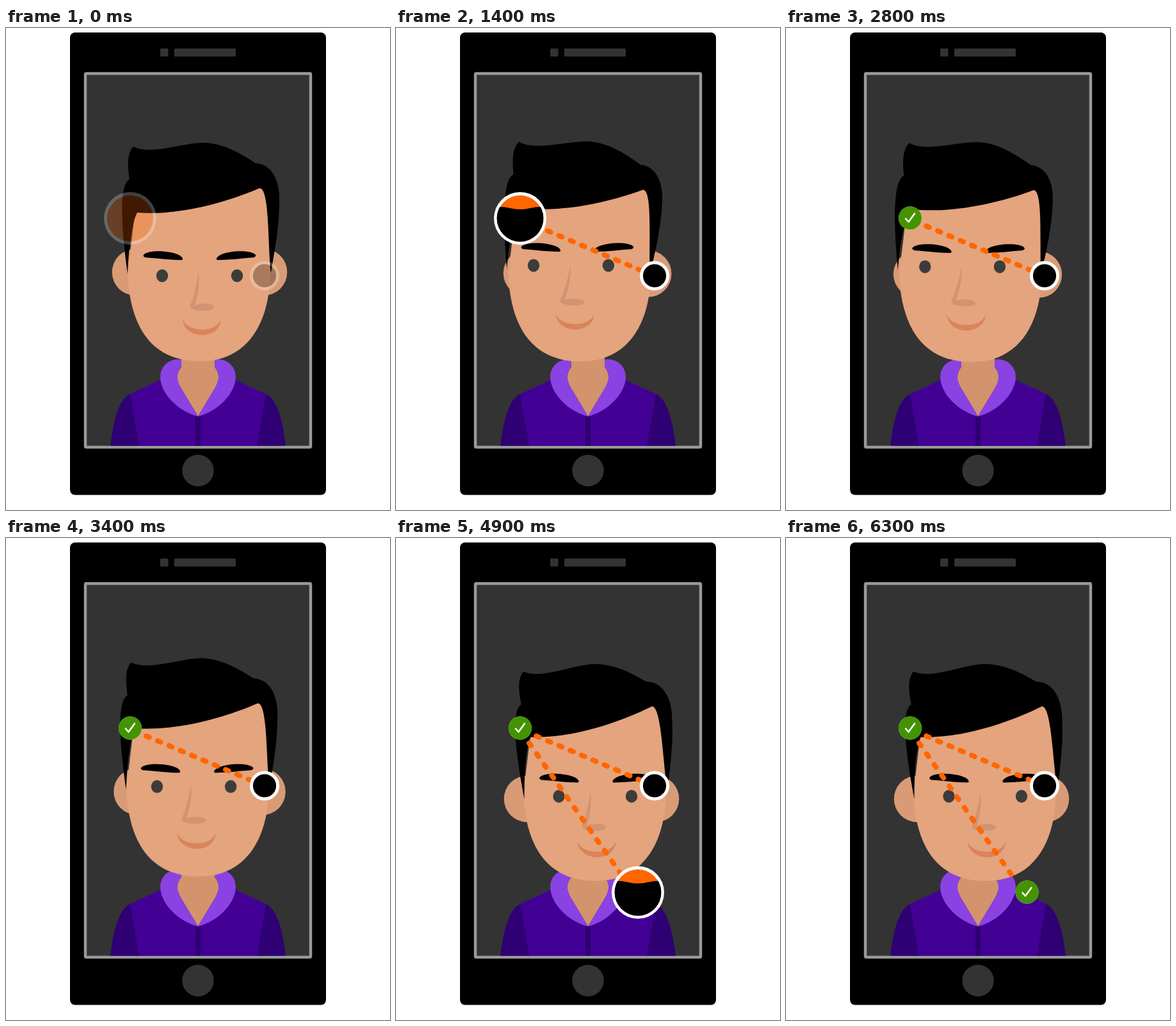
Animation of 600x752 px, one loop 6.7 s. Source, as an HTML page:

```html
<!DOCTYPE html>
<html lang="en">
<head>
<meta charset="utf-8">
<title>Face scan</title>
<style>
  html, body { margin: 0; width: 100%; height: 100%; overflow: hidden; background: #fff; }
  svg { display: block; width: 600px; height: 752px; }
  .dash { fill: none; stroke: #f60; stroke-width: 8; stroke-linecap: round; }
</style>
</head>
<body>
<svg viewBox="0 0 600 752">
  <defs>
    <path id="browShape" d="M215 354C222 346 255 347 270 354C276 357 278 361.5 274 362C255 362 235 359 218 358C215 357 214 355 215 354Z"/>
    <path id="lobe" fill="#8a43e2" d="M274 517C258 515 241 525 241 545C242 570 268 598 300 606L276 566C266 551 265 540 274 529Z"/>
    <path id="sleeve" fill="#2f0073" d="M163 652C167 618 175 579 194 571L209 652Z"/>
    <clipPath id="disc"><circle r="36.5"/></clipPath>
  </defs>

  <rect x="100" y="7" width="400" height="721.5" rx="8"/>
  <g fill="#333">
    <rect x="241" y="32" width="12.500" height="12.500" rx="1.500"/>
    <rect x="263" y="32" width="96" height="12.500" rx="1.500"/>
    <circle cx="300" cy="690.5" r="24.700"/>
    <rect x="124" y="71" width="352" height="583" rx="1.500" stroke="#999" stroke-width="4.500"/>
  </g>

  <use href="#sleeve"/>
  <use href="#sleeve" transform="matrix(-1 0 0 1 600 0)"/>
  <path fill="#420094" d="M194 571L248 546H352L406 571L392 652H208Z"/>
  <path fill="#2f0073" d="M296 600H304V652H296Z"/>
  <path fill="#d2936d" d="M274 500H326V529C335 540 334 551 324 566L300 606L276 566C266 551 265 540 274 529Z"/>
  <use href="#lobe"/>
  <use href="#lobe" transform="matrix(-1 0 0 1 600 0)"/>

  <g fill="#d99b76">
    <circle id="earL" cx="202" cy="381" r="36.300"/>
    <circle id="earR" cx="403" cy="381" r="36.300"/>
  </g>
  <path id="face" fill="#e4a47d" d="M206 240L200 300L190 384C194 470 230 520 303 520C375 520 412 465 413 380L414 330V240Z"/>
  <path id="hair" d="M190 384C182 325 174 246 193 236C189 213 190 194 199 185C225 199 275 179 309 179C340 180 367 196 390 211C414 212 426 235 427 262C428 308 420 345 414 382C409 340 412 248 396 250C345 272 270 293 205 288C196 305 192 345 190 384Z"/>
  <g id="brows">
    <use href="#browShape"/>
    <use href="#browShape" transform="matrix(-1 0 0 1 605 0)"/>
  </g>
  <g fill="#3c3c3c">
    <ellipse id="eyeL" cx="244" cy="386.500" rx="9.200" ry="10"/>
    <ellipse id="eyeR" cx="361" cy="386.500" rx="9.200" ry="10"/>
  </g>
  <path id="nose" fill="#d19371" d="M301 380C297 405 292 425 288 432C285 440 300 441 308 441C331 441 331 430 310 430C304 430 299 431 295 433C300 415 303 400 301 380Z"/>
  <path id="mouth" fill="#d9845a" d="M276 454C283 476 330 476 336 454C336 469 322 479 307 479C290 479 276 468 276 454Z"/>

  <path id="line0" class="dash" stroke-dasharray="5 14.220" d="M201.500 301.500L383.500 378.500"/>
  <path id="line1" class="dash" stroke-dasharray="5 15.460" d="M208 320L352 525"/>
  <g id="dot">
    <circle cx="404" cy="386.500" r="20.600" stroke="#fff" stroke-width="5"/>
  </g>
  <g id="targets"></g>
</svg>

<script>
const LOOP = 6700, STEP = 100, LAST = 6300, GAP = 3500;
const $ = id => document.getElementById(id);
const clamp = v => Math.max(0, Math.min(1, v));
const ramp = (t, a, b) => clamp((t - a) / (b - a));
const smooth = p => p * p * (3 - 2 * p);
const mix = (a, b, p) => a + (b - a) * p;

// part: turned pose, lowered pose (dx, dy, degrees)
const poses = {
  earL:  [[2, 1, 0],      [3, 26, 0]],
  earR:  [[-9, 2, 0],     [3, 26, 0]],
  face:  [[-15, 0, 0],    [9, 15, 0]],
  hair:  [[-7, -2.7, 3],  [0, 18, -3]],
  brows: [[-19.5, -13.5, 0], [9.5, 19.5, 0]],
  eyeL:  [[-29.7, -16.5, 0], [10.5, 16.5, 0]],
  eyeR:  [[-29.7, -16.5, 0], [7, 16.5, 0]],
  nose:  [[-32, -8.5, 3], [3, 16, 0]],
  mouth: [[-27, -9, 0],   [7.5, 19, 0]]
};
const pivots = { hair: '300 185', nose: '307 436' };

// fill level relative to the disc centre
const levels = [[200, 38], [300, 34], [700, 20], [1400, -16], [1800, -40]];
function levelAt(t) {
  let y = levels[0][1];
  for (let i = 1; i < levels.length; i++) {
    const [t0, y0] = levels[i - 1], [t1, y1] = levels[i];
    if (t >= t0) y = mix(y0, y1, ramp(t, t0, t1));
  }
  return y;
}

function wave(t) {
  const y = levelAt(t);
  let d = 'M-40 40';
  for (let x = -40; x <= 40; x += 4) {
    d += `L${x} ${y + 2 * Math.cos(x * Math.PI / 32 + (t - 1400) / 300)}`;
  }
  return d + 'L40 40Z';
}

function makeTarget(x, y, endX, endY, start, line) {
  const g = document.createElementNS('http://www.w3.org/2000/svg', 'g');
  g.innerHTML = `<circle class="ring" fill="#fff"/><circle class="core"/>
    <path class="fill" clip-path="url(#disc)"/>
    <path class="tick" d="M-7 1L-2.500 6L7 -7" fill="none" stroke="#fff" stroke-width="2.600"
      stroke-linecap="round" stroke-linejoin="round"/>`;
  $('targets').append(g);
  const [ring, core, fill, tick] = g.children;
  return time => {
    const t = time - start;
    const shrink = smooth(ramp(t, 2350, 2700));
    const tint = ramp(t, 2400, 2600);
    const r = mix(36, 18, shrink);
    g.setAttribute('opacity', t < 0 ? 0 : ramp(t, -100, 300));
    g.setAttribute('transform', `translate(${mix(x, endX, shrink)} ${mix(y, endY, shrink)})`);
    ring.setAttribute('r', r + 5 * (1 - shrink));
    core.setAttribute('r', r);
    core.setAttribute('fill', `rgb(${mix(255, 67, tint)},${mix(102, 148, tint)},0)`);
    fill.setAttribute('d', wave(t));
    fill.setAttribute('opacity', 1 - ramp(t, 1900, 2330));
    tick.setAttribute('opacity', ramp(t, 2500, 2700));
    line.setAttribute('opacity', ramp(t, 0, 350));
  };
}

const targets = [
  makeTarget(194, 297, 194, 296.5, 0, $('line0')),
  makeTarget(378, 553, 376.5, 552.5, GAP, $('line1'))
];

function draw(t) {
  const turn = smooth(ramp(t, 0, 1000));
  const drift = 0.08 * ramp(t, 1000, 3000);
  const lower = mix(drift, 1, smooth(ramp(t, 3000, 3800)));
  for (const id in poses) {
    const [b, c] = poses[id];
    const [x, y, a] = b.map((v, i) => mix(v * turn, c[i], lower));
    $(id).setAttribute('transform', `translate(${x} ${y}) rotate(${a} ${pivots[id] || '0 0'})`);
  }
  $('dot').setAttribute('opacity', ramp(t, -100, 300));
  targets.forEach(update => update(t));
}

function tick() {
  const t = performance.now() % LOOP;
  draw(Math.min(LAST, Math.floor(t / STEP) * STEP));
  requestAnimationFrame(tick);
}
tick();
</script>
</body>
</html>
```
